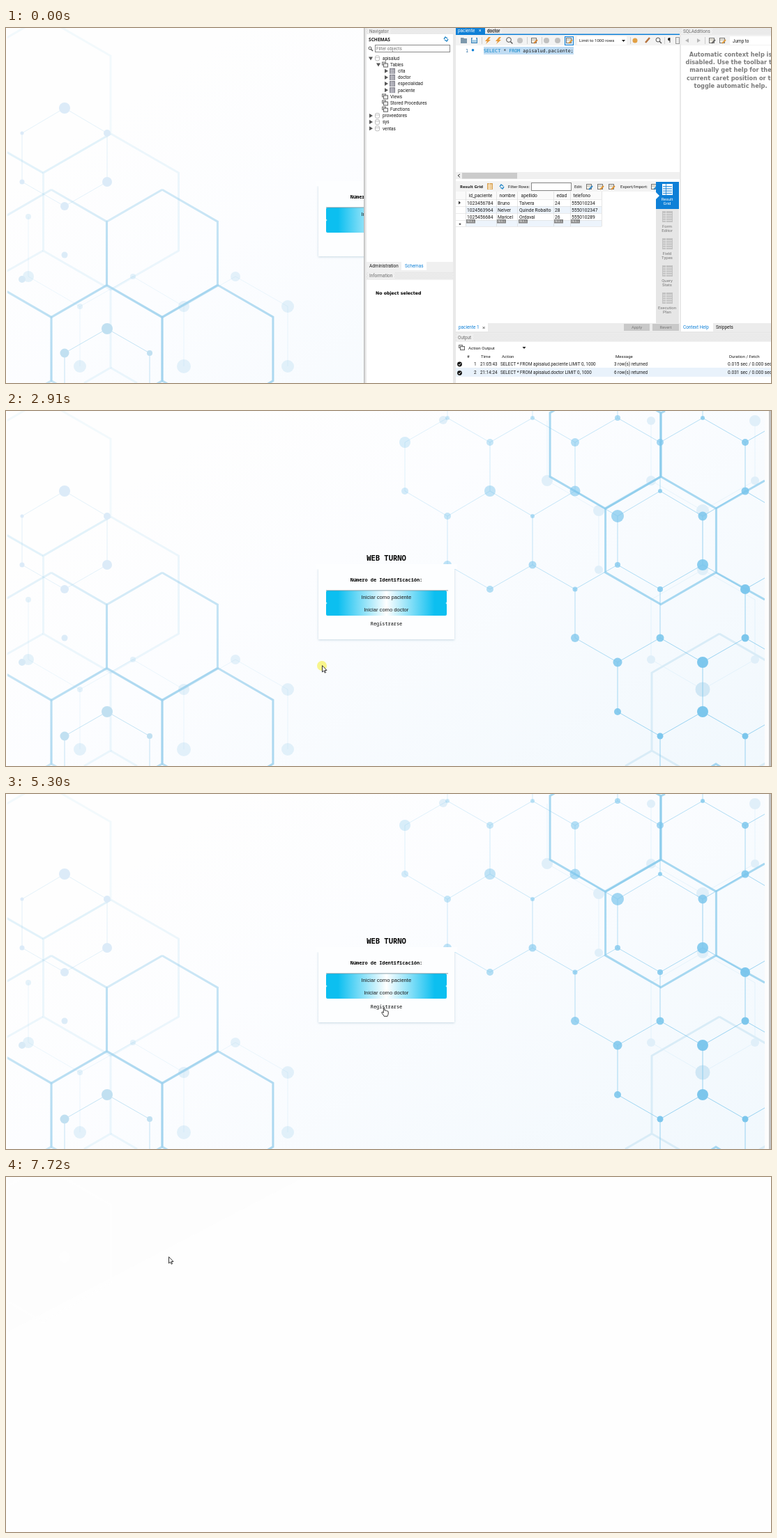
These frames come from a looping animation (1097 px wide and 510 px high, 8 s). An HTML page with a canvas:

```html
<!DOCTYPE html>
<html lang="es">
<head>
<meta charset="utf-8">
<title>Inicio</title>
<style>
html, body { margin: 0; width: 100%; height: 100%; overflow: hidden; background: #fff; }
canvas { display: block; }
</style>
</head>
<body>
<canvas id="stage" width="1097" height="510"></canvas>
<script>
const W = 1097, H = 510, LOOP = 8000;
const WINDOW_CLOSES = 2910, LINK_CLICK = 6080, BLANK_FROM = 7020;
const SANS = 'Roboto, sans-serif', BOLD = '"Noto Sans", sans-serif', WIDE = '"DejaVu Sans", sans-serif';
const MONO = '"Noto Sans Mono", monospace', CODE = '"DejaVu Sans Mono", monospace', ARIAL = '"Liberation Sans", Arial, sans-serif';
const BLUE = '#0f80d7', GREY = '#f0f0f0', INK = '#1a1a1a';
const stage = document.getElementById('stage').getContext('2d');
let c = stage;

function bake(draw) {
  const layer = document.createElement('canvas');
  layer.width = W;
  layer.height = H;
  c = layer.getContext('2d');
  draw();
  c = stage;
  return layer;
}
function rect(x0, y0, x1, y1, fill) {
  c.fillStyle = fill;
  c.fillRect(x0, y0, x1 - x0, y1 - y0);
}
function frame(x0, y0, x1, y1, color, fill = '#fff') {
  rect(x0, y0, x1, y1, color);
  rect(x0 + 1, y0 + 1, x1 - 1, y1 - 1, fill);
}
function dot(x, y, r, fill) {
  c.fillStyle = fill;
  c.beginPath();
  c.arc(x, y, r, 0, 7);
  c.fill();
}
function line(points, color, width = 1) {
  c.strokeStyle = color;
  c.lineWidth = width;
  c.beginPath();
  points.forEach(([x, y]) => c.lineTo(x, y));
  c.stroke();
}
function shape(points, fill) {
  c.fillStyle = fill;
  c.beginPath();
  points.forEach(([x, y]) => c.lineTo(x, y));
  c.fill();
}
// y is the middle of the capital letters
function text(str, x, y, { size = 6.4, color = INK, font = SANS, weight = 400, align = 'left' } = {}) {
  c.font = `${weight} ${size}px ${font}`;
  c.fillStyle = color;
  c.textAlign = align;
  c.fillText(str, x, y + size * 0.36);
}

/* ---------- web page ---------- */
const blueAt = (x, y) => Math.min(0.98, Math.max(0.24, (x + 0.6 * y - 350) / 900));
const strong = (x, y) => `rgba(121,197,236,${blueAt(x, y)})`;

function network(nodes, length, lineColor, dotColor) {
  nodes.forEach(([x, y], i) => nodes.slice(i + 1).forEach(([u, v]) => {
    if (Math.abs(Math.hypot(u - x, v - y) - length) < 3) line([[x, y], [u, v]], lineColor((x + u) / 2, (y + v) / 2));
  }));
  nodes.forEach(([x, y, r]) => r && dot(x, y, r, dotColor(x, y)));
}
function hexagon(x, y, r, color, width = 3) {
  const pts = [];
  for (let k = 0; k < 7; k++) pts.push([x + r * Math.sin(k * Math.PI / 3), y - r * Math.cos(k * Math.PI / 3)]);
  line(pts, color, width);
}
function fade(x0, y0, a0, x1, y1, a1) {
  const g = c.createLinearGradient(x0, y0, x1, y1);
  g.addColorStop(0, `rgba(150,206,236,${a0})`);
  g.addColorStop(1, `rgba(150,206,236,${a1})`);
  return g;
}
function lattice() {
  const radii = [[8, 5], [3, 5, 6], [5, 8, 5], [3, 3, 5.5], [6, 7.5, 3.5, 6], [4, 9, 4, 6.5, 5],
    [5, 3, 4, 5.5, 4.5], [3, 6.5, 8, 8, 8], [5, 5.5, 7, 5.5, 4.5], [0, 0, 0, 0, 0]];
  const nodes = [];
  radii.forEach((column, i) => {
    const ys = i % 2 ? [10, 151, 221, 361, 432] : [45, 115, 256, 326, 467];
    const x = 572 + 61 * i;
    column.forEach((r, k) => nodes.push([x, ys[k], r]));
    if (i % 2) nodes.push([x, -60, 0]);
    else if (i > 5) nodes.push([x, 537, 0]);
  });
  return nodes;
}
function drawBackdrop() {
  rect(0, 0, W, H, '#fff');
  c.save();
  c.beginPath();
  c.rect(2, 0, 1086, H);
  c.clip();
  const sky = c.createLinearGradient(330, 0, 800, 700);
  sky.addColorStop(0, '#fefefe');
  sky.addColorStop(0.3, '#fcfdff');
  sky.addColorStop(1, '#f1f8fd');
  rect(0, 0, W, H, sky);

  const pale = 'rgba(150,206,236,0.17)';
  hexagon(150.5, 264, 112, pale);
  hexagon(53, 96, 112, 'rgba(150,206,236,0.11)');
  line([[53, 208], [0, 178]], pale, 3);
  line([[53, 320], [0, 350]], pale, 3);
  line([[150, 375], [150, 488], [112, 510]], pale, 3);
  line([[150, 488], [188, 510]], pale, 3);

  const left = fade(20, 210, 0.2, 380, 480, 0.78);
  [[65, 324], [224, 324], [144.5, 461], [303.5, 461], [-14.5, 461]].forEach(([x, y]) => hexagon(x, y, 91.7, left));

  const faintLine = () => 'rgba(150,206,236,0.17)', faintDot = () => 'rgba(150,206,236,0.24)';
  network([[32, 271, 4], [32, 357, 8], [106, 400, 4], [106, 486, 9], [182, 357, 4], [255, 400, 8], [255, 486, 10],
    [329, 357, 7], [404, 400, 9], [404, 486, 9]], 85.7, faintLine, faintDot);
  network([[84, 115, 8], [145, 151, 5], [145, 221, 7], [84, 256, 6], [23, 221, 3.5], [23, 151, 2.5]], 70.5,
    () => 'rgba(150,206,236,0.26)', () => '#dcebf8');
  dot(84, 326, 4.5, '#dcecf8');
  dot(23, 361, 5, '#d8eaf6');
  network([[84, 467, 6.5], [145, 432, 8], [206, 467, 4], [84, 537, 0], [206, 537, 0]], 70.5,
    () => 'rgba(150,206,236,0.55)', () => '#c1e0f1');

  network([[627, 13, 6], [776, 14, 0], [776, 100, 8], [850, 143, 8], [850, 228, 6], [925, 14, 6], [925, 100, 7],
    [925, 271, 0], [925, 357, 6], [999, 143, 9], [999, 228, 8], [999, 400, 10.5], [1074, 14, 8], [1074, 100, 6],
    [1074, 271, 0], [1074, 357, 6]], 85.7, faintLine, (x, y) => y > 390 ? '#d0e7f5' : '#e0eff9');
  hexagon(1023, 432, 112, '#d9ecf7');
  line([[926, 488], [888, 510]], '#d9ecf7', 3);
  const right = 'rgba(140,204,237,0.75)';
  hexagon(859.5, 48.5, 91.7, right);
  hexagon(939, 186, 91.7, right);
  line([[939, 95], [939, 3], [945, 0]], right, 3);
  line([[1018, 140], [1088, 100]], right, 3);
  line([[1018, 232], [1088, 271]], right, 3);
  line([[1010, 512], [1018, 507], [1026, 512]], right, 3);
  network(lattice(), 70.5, (x, y) => `rgba(121,197,236,${blueAt(x, y) * 0.75})`, strong);
  c.restore();
  rect(1088, 0, 1094, H, '#fcfcfc');
  rect(1094, 0, W, H, '#c3c3c3');
}
function button(y, label, hover) {
  const g = c.createLinearGradient(459, 0, 632, 0);
  const edge = hover ? '#0a87a8' : '#0cbff0';
  g.addColorStop(0, edge);
  g.addColorStop(0.1, edge);
  g.addColorStop(0.5, hover ? '#f2f2f2' : '#ffffff');
  g.addColorStop(0.9, edge);
  g.addColorStop(1, edge);
  c.fillStyle = g;
  c.beginPath();
  c.roundRect(459, y, 173, 18, 2);
  c.fill();
  text(label, 545.3, y + 9.2, { size: 7.6, font: ARIAL, align: 'center' });
}
function drawForm(hover) {
  c.save();
  c.shadowColor = 'rgba(120,160,185,0.4)';
  c.shadowBlur = 3;
  c.shadowOffsetY = 1;
  rect(448, 226, 643, 328, '#fdfeff');
  c.restore();
  rect(444, 220, 647, 227, '#fdfeff');
  const center = { font: MONO, color: '#000', align: 'center' };
  text('WEB TURNO', 545.5, 211, { ...center, size: 10.5, weight: 700 });
  text('Número de Identificación:', 545.5, 242.7, { ...center, size: 6.9, weight: 700 });
  button(258, 'Iniciar como paciente', hover === 1);
  button(276, 'Iniciar como doctor', hover === 2);
  rect(459, 257.5, 634, 258.3, '#6f8a94');
  text('Registrarse', 545.5, 306, { ...center, size: 6.9 });
}

/* ---------- database window ---------- */
function hatch(x0, y0, x1, y1, label, x) {
  rect(x0, y0, x1, y1, '#efefef');
  for (let y = y0 + 1; y < y1 - 1; y += 2)
    for (let u = x0 + (y % 4 < 2 ? 0 : 1); u < x1; u += 2) rect(u, y, u + 1, y + 1, '#dcdcdc');
  c.font = `6.4px ${SANS}`;
  rect(x - 2, y0, x + c.measureText(label).width + 3, y1, '#efefef');
  text(label, x, (y0 + y1) / 2, { color: '#6e6e6e' });
}
function triangle(x, y, open) {
  shape(open ? [[x - 3, y - 2], [x + 3, y - 2], [x, y + 3]] : [[x - 2, y - 3], [x + 3, y], [x - 2, y + 3]], '#555');
}
function lens(x, y, r = 2.5) {
  c.strokeStyle = '#555';
  c.lineWidth = 1;
  c.beginPath();
  c.arc(x - 1, y - 1, r, 0, 7);
  c.stroke();
  line([[x + r - 2, y + r - 2], [x + r + 1, y + r + 1]], '#555', 1.4);
}
function bolt(x, y) {
  shape([[x + 1, y - 5], [x - 4, y + 1], [x - 1, y + 1], [x - 3, y + 5], [x + 4, y - 1], [x + 1, y - 1], [x + 4, y - 5]], '#e59a3c');
}
function sheet(x, y, accent) {
  frame(x - 4, y - 4, x + 4, y + 4, '#777', '#f7f2e6');
  line([[x - 3, y - 1], [x + 3, y - 1]], '#999', 0.8);
  line([[x, y + 4], [x + 5, y - 1]], accent, 1.8);
}
function swirl(x, y) {
  line([[x - 3, y], [x - 1, y - 3], [x + 2, y - 1]], '#2688c8', 1.4);
  line([[x + 3, y], [x + 1, y + 3], [x - 2, y + 1]], '#2688c8', 1.4);
}
function stackIcon(x, y) {
  frame(x - 4, y - 4, x + 2, y + 1, '#777', '#ddd');
  frame(x - 2, y - 2, x + 5, y + 4, '#666', '#eee');
}
function gridIcon(x, y, w, h, color, back) {
  rect(x, y, x + w, y + h, color);
  for (let k = 1; k < 5; k++) rect(x + 1, y + k * h / 5, x + w - 1, y + k * h / 5 + 1, back);
  rect(x + w / 3, y, x + w / 3 + 0.8, y + h, back);
}
function drawNavigator() {
  hatch(517, 0, 641, 9, 'Navigator', 521);
  rect(517, 9, 641, 336, '#fff');
  text('SCHEMAS', 520, 16.6, { size: 6.6, font: BOLD, weight: 700 });
  swirl(631, 16);
  lens(523, 30, 2);
  frame(529, 24, 637, 35, '#8a8a8a');
  text('Filter objects', 531, 29.6, { color: '#777' });
  const rows = [[0, 'apisalud'], [1, 'Tables'], [2, 'cita'], [2, 'doctor'], [2, 'especialidad'], [2, 'paciente'],
    [3, 'Views'], [3, 'Stored Procedures'], [3, 'Functions'], [4, 'proveedores'], [4, 'sys'], [4, 'ventas']];
  rows.forEach(([kind, label], i) => {
    const y = 43.4 + 9.17 * i, x = [540, 551, 562, 551, 540][kind];
    if (kind !== 3) triangle(x - 17, y, kind < 2);
    if (kind === 2) gridIcon(550, y - 4, 8, 8, '#85858f', '#c4c4cc');
    else if (kind % 4) stackIcon(543, y);
    else {
      c.beginPath();
      c.roundRect(529.5, y - 3.5, 6, 7, 2);
      c.strokeStyle = '#aaa';
      c.lineWidth = 0.8;
      c.stroke();
      line([[530, y - 1], [535, y - 1]], '#bbb', 0.8);
    }
    text(label, x, y);
  });
  text('Administration', 521, 341.7);
  rect(567, 336, 603, 348, '#fff');
  text('Schemas', 572, 341.7, { color: BLUE });
  hatch(517, 350, 641, 362, 'Information', 521);
  rect(517, 362, 641, H, '#fff');
  text('No object selected', 530, 380.4, { size: 6.25, font: WIDE, weight: 700, color: '#000' });
}
function drawEditor() {
  hatch(645, 0, 966, 9, 'doctor', 690);
  rect(645, 0, 687, 9, BLUE);
  text('paciente', 648, 3.8, { color: '#fff' });
  text('×', 678, 4, { color: '#fff' });
  text('doctor', 690, 3.8);
  rect(645, 8.5, 966, 10, BLUE);
  rect(645, 10, 966, 25, '#f3f3f3');
  shape([[652, 14], [656, 14], [657, 15], [661, 15], [661, 22], [652, 22]], '#7d98ac');
  frame(667, 14, 676, 22, '#3f86bc', '#a7cee6');
  rect(669, 14, 674, 17, '#fff');
  [691, 706].forEach(x => bolt(x, 18));
  lens(722, 18, 3.4);
  dot(737, 18, 4, '#c2c2c2');
  sheet(757, 18, '#d88331');
  [775, 791].forEach(x => dot(x, 18, 4, '#c0c0c0'));
  frame(801, 12, 814, 25, BLUE, '#cfe6f8');
  sheet(807, 18, '#df9a39');
  [682, 747, 768, 895, 944].forEach(x => rect(x, 13, x + 1, 23, '#cfcfcf'));
  rect(819, 12, 890, 24, '#fff');
  text('Limit to 1000 rows', 822, 18.2, { size: 6.1 });
  shape([[883, 17], [888, 17], [885.5, 20]], '#222');
  dot(902, 18, 3.5, '#e2a044');
  line([[917, 21], [923, 14]], '#b4723f', 2.5);
  lens(936, 18, 3);
  text('¶', 951, 18.2, { size: 9, align: 'center' });
  frame(960, 13, 966, 23, '#999', '#eee');
  rect(645, 25, 966, 207, '#fff');
  text('1', 663, 32.5, { size: 6.7, font: CODE, color: '#2f6fa5', align: 'right' });
  dot(669.5, 31.8, 1.8, BLUE);
  rect(685, 27, 814, 38, '#c0dcf3');
  const code = { size: 6.7, font: CODE };
  text('SELECT', 685, 32.4, { ...code, color: '#0b86c9' });
  text('       *      apisalud.paciente;', 685, 32.4, code);
  text('         FROM', 685, 32.4, { ...code, color: '#0b86c9' });
  rect(645, 207, 966, 217, GREY);
  rect(654, 208, 733, 216.5, '#cbcbcb');
  line([[651, 210], [648, 212], [651, 214.5]], '#444');
}
function drawResults() {
  rect(645, 217, 966, 424, '#fff');
  rect(645, 220, 932, 235, '#f3f3f3');
  text('Result Grid', 651, 227.8, { size: 6, font: BOLD, weight: 700 });
  gridIcon(690, 223, 8, 9, '#d9a253', '#fff3da');
  swirl(711, 228);
  text('Filter Rows:', 720, 227.8, { size: 6 });
  frame(753, 222, 811, 234, '#888');
  text('Edit:', 815, 227.8, { size: 6 });
  sheet(836, 228, '#2d87c8');
  sheet(852, 228, '#df9333');
  sheet(868, 228, '#df9333');
  text('Export/Import:', 881, 227.8, { size: 6 });
  sheet(929, 228, '#2d87c8');
  rect(645, 235, 854, 246, '#fafafa');
  rect(659, 256, 854, 266, '#edf4fc');
  rect(659, 276, 854, 285, '#edf4fc');
  [246, 256, 266, 276, 285].forEach(y => rect(645, y, 854, y + 0.6, '#dedede'));
  [659, 703, 733, 785, 809, 854].forEach(x => rect(x, 235, x + 0.6, 285, '#d6d6d6'));
  const rows = [
    ['id_paciente', 'nombre', 'apellido', 'edad', 'telefono'],
    ['1023456784', 'Bruno', 'Talvera', '24', '555010234'],
    ['1024563964', 'Nelver', 'Quinde Robalto', '28', '5550102347'],
    ['1025456684', 'Maricel', 'Ordaval', '26', '555010289']];
  const xs = [661, 705, 736, 787, 811];
  rows.forEach((row, i) => row.forEach((cell, k) => text(cell, xs[k] + (i ? 0 : 2.5), 241 + 10.1 * i, { size: 6.7 })));
  xs.forEach(x => {
    rect(x - 1, 275, x + 12, 280.5, '#858585');
    text('NULL', x + 5.5, 277.8, { size: 4.3, color: '#fff', align: 'center' });
  });
  shape([[649, 248.5], [652, 251], [649, 253.5]], '#333');
  text('*', 651, 282, { size: 8, align: 'center' });

  rect(932, 221, 965, 424, '#e6e6e6');
  rect(932, 221, 965, 260, BLUE);
  shape([[932, 236], [937, 241], [932, 246]], '#fff');
  [['Result', 'Grid'], ['Form', 'Editor'], ['Field', 'Types'], ['Query', 'Stats'], ['Execution', 'Plan']].forEach((pair, i) => {
    const y = 224 + 39 * i, color = i ? '#777' : '#fff';
    gridIcon(941, y, 15, 16, i ? '#c3c3c3' : '#fff', i ? '#e6e6e6' : BLUE);
    pair.forEach((word, k) => text(word, 948, y + 22 + 6.3 * k, { size: 6, color, align: 'center' }));
  });
  rect(645, 424, 966, 436, '#ececec');
  rect(645, 424, 691, 436, '#fff');
  text('paciente 1', 649, 430, { color: BLUE });
  text('×', 683, 430.3, { color: '#555', size: 8 });
  [[886, 923, 'Apply'], [927, 965, 'Revert']].forEach(([x0, x1, label]) => {
    rect(x0, 425, x1, 435, '#c9c9c9');
    text(label, (x0 + x1) / 2, 430, { color: '#777', size: 6, align: 'center' });
  });
}
function drawHelp() {
  hatch(968, 0, W, 9, 'SQLAdditions', 971);
  rect(968, 10, W, 25, '#f3f3f3');
  shape([[979, 15], [974, 18], [979, 21]], '#b5b5b5');
  shape([[991, 15], [996, 18], [991, 21]], '#b5b5b5');
  sheet(1012, 18, '#666');
  sheet(1027, 18, '#df9a39');
  rect(1002, 13, 1003, 23, '#ccc');
  rect(1038, 12, W, 24, '#fff');
  text('Jump to', 1042, 18.2);
  rect(968, 25, W, 424, '#fff');
  ['Automatic context help is', 'disabled. Use the toolbar to', 'manually get help for the',
    'current caret position or to', 'toggle automatic help.'].forEach((s, i) =>
    text(s, 1039, 38 + 11.2 * i, { size: 8.2, font: WIDE, weight: 700, color: '#7b7b7b', align: 'center' }));
  rect(968, 424, W, 436, '#ececec');
  rect(968, 424, 1014, 436, '#fff');
  text('Context Help', 971, 430, { color: BLUE });
  text('Snippets', 1018, 430);
}
function drawOutput() {
  hatch(645, 439, W, 451, 'Output', 648);
  rect(645, 451, W, H, '#fff');
  stackIcon(653, 459);
  text('Action Output', 663, 459.5, { size: 6.2 });
  shape([[740.5, 458], [745.5, 458], [743, 461]], '#222');
  rect(645, 488, W, 501, '#e9f2fb');
  const xs = [661, 681, 711, 874, 1037];
  ['#', 'Time', 'Action', 'Message', 'Duration / Fetch'].forEach((s, i) => text(s, xs[i], 472, { size: 6.1 }));
  [['1', '21:05:43', 'paciente', '3', '0.015'], ['2', '21:14:24', 'doctor', '6', '0.031']].forEach(([n, time, table, count, sec], i) => {
    const y = 482.5 + 12.6 * i;
    dot(650.5, y + 0.5, 3.4, '#111');
    line([[649, y + 0.5], [650, y + 2], [652.3, y - 1]], '#fff', 0.9);
    text(n, 671, y);
    text(time, 680, y);
    text(`SELECT * FROM apisalud.${table} LIMIT 0, 1000`, 709, y, { size: 6.35 });
    text(`${count} row(s) returned`, 872, y, { size: 6.3 });
    text(`${sec} sec / 0.000 sec`, 1035, y, { size: 6.6 });
  });
}
function drawWindow() {
  rect(513, 0, W, H, '#e9e9e9');
  rect(513, 0, 514.5, H, '#bdbdbd');
  rect(517, 336, 641, 350, GREY);
  drawNavigator();
  drawEditor();
  drawResults();
  drawHelp();
  drawOutput();
}
function drawBlank() {
  rect(0, 0, W, H, '#fefefe');
  shape([[3, 0], [428, 0], [3, 222]], '#fdfdfd');
  hexagon(53, 96, 112, '#fefefe');
  dot(84, 115, 8, '#fefefe');
}

/* ---------- pointer ---------- */
// [start, end, steps, x, y, bend]: stepped travel to (x, y)
const moves = [
  [140, 310, 3, 787, 422, 0], [570, 770, 4, 572, 355, 0], [1030, 1370, 6, 454, 360, 9], [2360, 2560, 4, 453, 365, 0],
  [3030, 3440, 6, 526, 274, 0], [3500, 3630, 3, 546, 268, 0], [3830, 3830, 1, 545, 269, 0], [4490, 4690, 4, 544, 285, 0],
  [4890, 5020, 3, 542, 300, 0], [5230, 5300, 2, 542, 306, 0], [5640, 5705, 2, 534, 299, 0], [5770, 5770, 1, 542, 306, 0],
  [6240, 6440, 4, 467, 149, 0], [7520, 7720, 4, 233, 114, 0]];

function pointerAt(t) {
  let x = 938, y = 482;
  for (const [start, end, steps, toX, toY, bend] of moves) {
    if (t < start) break;
    const done = t >= end ? 1 : (Math.floor((t - start) / (end - start) * (steps - 1)) + 1) / steps;
    const p = done * (2 - done) * 0.4 + done * 0.6;
    x += (toX - x) * p;
    y += (toY - y) * p + bend * 4 * p * (1 - p);
  }
  return [Math.round(x), Math.round(y)];
}
function zoneAt(x, y, t) {
  if (t < WINDOW_CLOSES || t >= LINK_CLICK) return 0;
  if (x >= 459 && x < 632 && y >= 258 && y < 294) return y < 276 ? 1 : 2;
  return x > 522 && x < 568 && y > 300 && y < 312 ? 3 : 0;
}
function outline(path, x, y) {
  c.save();
  c.translate(x, y);
  const p = new Path2D(path);
  c.fillStyle = '#fff';
  c.fill(p);
  c.strokeStyle = '#222';
  c.lineWidth = 0.9;
  c.lineJoin = 'round';
  c.stroke(p);
  c.restore();
}
const ARROW = 'M.5 .7V10L2.7 8 4.2 11.2 5.6 10.5 4.1 7.5H7Z';
const HAND = 'M3.3 8.3V1.5Q4 .1 5 1.5V5Q6 4.3 6.8 5.3 7.8 4.8 8.5 5.8 10 5.4 10.2 7V10Q9.6 11.4 9 13.3H4.2Q3.4 11.5 .8 8.4 .8 6.7 2 7.2Z';

const backdrop = bake(drawBackdrop);
const pages = [0, 1, 2].map(hover => bake(() => {
  c.drawImage(backdrop, 0, 0);
  drawForm(hover);
}));
const windowed = bake(() => {
  c.drawImage(pages[0], 0, 0);
  drawWindow();
});
const blank = bake(drawBlank);

function render(now) {
  const t = now % LOOP;
  const [x, y] = pointerAt(t);
  const zone = zoneAt(x, y, t);
  const scene = t < WINDOW_CLOSES ? windowed : t < BLANK_FROM ? pages[zone % 3] : blank;
  c.drawImage(scene, 0, 0);
  if (t >= WINDOW_CLOSES && t < 3030) dot(453, 366, 7, '#f8f58c');
  if (t >= 140) outline(zone ? HAND : ARROW, zone ? x - 4 : x, y);
  requestAnimationFrame(render);
}
requestAnimationFrame(render);
</script>
</body>
</html>
```
